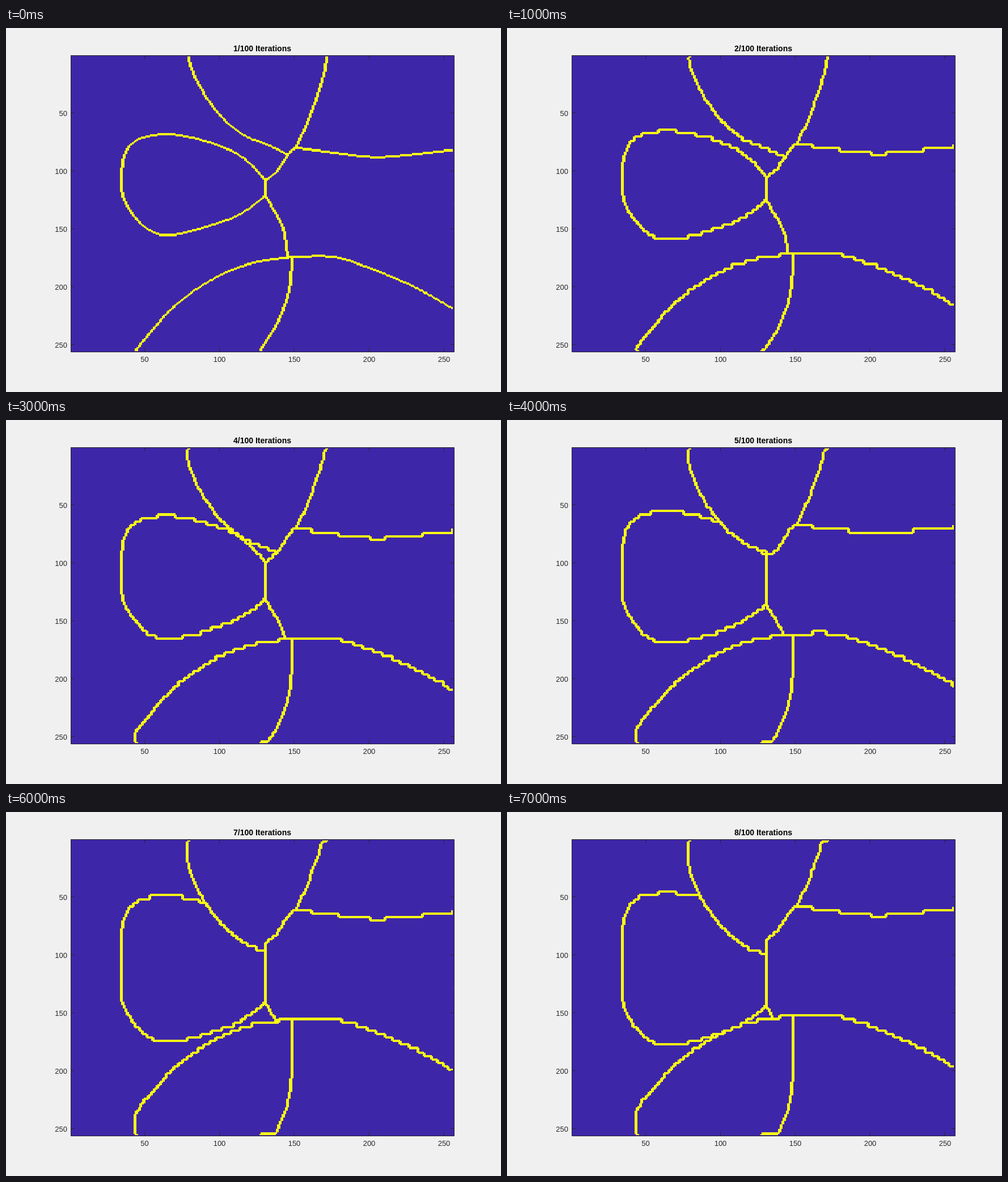
These frames come from a looping animation (873x641 px, 8000 ms). An HTML page with a canvas:

```html
<!DOCTYPE html>
<html>
<head>
<meta charset="utf-8">
<style>
  html, body { margin: 0; width: 100%; height: 100%; overflow: hidden; background: #f0f0f0; }
  canvas { display: block; }
</style>
</head>
<body>
<canvas id="stage" width="873" height="641"></canvas>
<script>
const ctx = document.getElementById('stage').getContext('2d');
const N = 256;
// The axes take fixed fractions of the stage
const LEFT = 873 * .13 + .1, TOP = 641 * .075 + .1;
const CELL_W = 873 * .775 / N, CELL_H = 641 * .815 / N;
const STEP = 22 / 7;      // rows a border travels per iteration
const PHASE = 1.3;        // offset of the row lattice the borders settle on
const ITERATIONS = 8, HOLD = 1000;

const cellX = i => LEFT + i * CELL_W;
const cellY = i => TOP + i * CELL_H;

// Catmull-Rom curve through x,y pairs, returned as a list of points
function curve(...v) {
  const pts = [];
  for (let i = 0; i < v.length; i += 2) pts.push([v[i], v[i + 1]]);
  const at = i => pts[Math.max(0, Math.min(pts.length - 1, i))];
  const out = [];
  for (let i = 0; i < pts.length - 1; i++) {
    const [a, b, c, d] = [at(i - 1), at(i), at(i + 1), at(i + 2)];
    for (let t = 0; t < 1; t += 1 / 16) {
      out.push([0, 1].map(j => b[j] + t / 2 * (c[j] - a[j] +
        t * (2 * a[j] - 5 * b[j] + 4 * c[j] - d[j] + t * (3 * (b[j] - c[j]) + d[j] - a[j])))));
    }
  }
  return [...out, at(pts.length - 1)];
}
const back = list => [...list].reverse();

const topLeft = curve(320, 48, 338, 96, 376, 152, 420, 189, 460, 205, 497, 223);
const topRight = curve(567, 48, 557, 95, 535, 158, 511, 211);
const neck = curve(511, 211, 497, 223, 477, 254, 457, 268);
const lobe = curve(457, 268, 415, 226, 350, 199, 278, 187, 219, 206, 203, 265,
  213, 312, 250, 354, 297, 364, 395, 336, 440, 309, 457, 295);
const stem = curve(457, 295, 478, 330, 490, 358, 497, 404);
const shelf = curve(511, 211, 575, 219, 650, 227, 722, 222, 791, 214);
const arcLeft = curve(226, 571, 296, 491, 376, 436, 440, 413, 505, 403.5);
const arcRight = curve(505, 403.5, 578, 403.5, 642, 423, 722, 457, 791, 496);
const divider = curve(505, 403.5, 499, 463, 478, 520, 446, 571);
const corner = [791, 571];

// Regions from weakest to strongest; a stronger one grows over a weaker one
const regions = [
  lobe,
  [...topLeft, ...back(topRight)],
  [...topRight, ...shelf, [791, 48]],
  [...neck, ...stem, [497, 571], corner, ...back(shelf)],
  [...arcRight, corner, [446, 571]],
  [...arcLeft, ...divider]
].map(points => {
  const path = new Path2D();
  points.forEach(p => path.lineTo(...p));
  path.closePath();
  return path;
});

const labels = new Uint8Array(N * N).map((_, i) => {
  const x = cellX(i % N + .5), y = cellY(Math.floor(i / N) + .5);
  let r = regions.length;
  while (r > 0 && !ctx.isPointInPath(regions[r - 1], x, y)) r--;
  return r;
});

// Vertical dilation that settles on a coarse row lattice; the outer rows stay fixed
function dilate(k) {
  if (!k) return labels;
  const grown = labels.slice();
  const reach = Math.floor(STEP * k - .5);
  const edge = n => Math.round(STEP * n + PHASE);
  for (let n = -1; edge(n) < N; n++) {
    const y0 = edge(n), y1 = edge(n + 1);
    const from = Math.max(0, y0 - reach - 1), to = Math.min(N, y1 + reach);
    for (let x = 0; x < N; x++) {
      let best = 0;
      for (let y = from; y < to; y++) best = Math.max(best, labels[y * N + x]);
      for (let y = Math.max(2, y0); y < Math.min(N - 2, y1); y++) grown[y * N + x] = best;
    }
  }
  return grown;
}

// A cell is lit when any direct neighbour belongs to another region
function drawBorders(map) {
  ctx.fillStyle = '#f9fb15';
  for (let y = 1; y < N - 1; y++) for (let x = 1; x < N - 1; x++) {
    const i = y * N + x;
    if ([i - 1, i + 1, i - N, i + N].some(j => map[j] !== map[i])) {
      const [x0, x1] = [x, x + 1].map(v => Math.round(cellX(v)));
      const [y0, y1] = [y, y + 1].map(v => Math.round(cellY(v)));
      ctx.fillRect(x0, y0, x1 - x0, y1 - y0);
    }
  }
}

function drawAxes() {
  const [l, t, r, b] = [114, 48, 790, 570].map(v => v + .5);
  ctx.strokeStyle = ctx.fillStyle = '#262626';
  ctx.font = '13px "Liberation Sans", Arial, sans-serif';
  ctx.beginPath();
  ctx.rect(l, t, r - l, b - t);
  for (let v = 50; v <= 250; v += 50) {
    const x = Math.floor(cellX(v - .5)) + .5, y = Math.floor(cellY(v - .5)) + .5;
    for (const [x0, y0, dx, dy] of [[x, t, 0, 6], [x, b, 0, -6], [l, y, 6, 0], [r, y, -6, 0]]) {
      ctx.moveTo(x0, y0);
      ctx.lineTo(x0 + dx, y0 + dy);
    }
    ctx.textAlign = 'center';
    ctx.fillText(v, x, 588);
    ctx.textAlign = 'right';
    ctx.fillText(v, 108, y + 5.5);
  }
  ctx.stroke();
}

const maps = Array.from({ length: ITERATIONS }, (_, k) => dilate(k));
let shown = -1;

function draw(k) {
  ctx.fillStyle = '#f0f0f0';
  ctx.fillRect(0, 0, 873, 641);
  ctx.fillStyle = '#3e26a8';
  ctx.fillRect(114, 48, 676, 522);
  drawBorders(maps[k]);
  drawAxes();
  ctx.fillStyle = '#000';
  ctx.textAlign = 'center';
  ctx.font = 'bold 14px "Liberation Sans", Arial, sans-serif';
  ctx.fillText(`${k + 1}/100 Iterations`, 452, 41);
}

function tick() {
  const k = Math.floor(performance.now() / HOLD) % ITERATIONS;
  if (k !== shown) draw(shown = k);
  requestAnimationFrame(tick);
}
tick();
</script>
</body>
</html>
```
